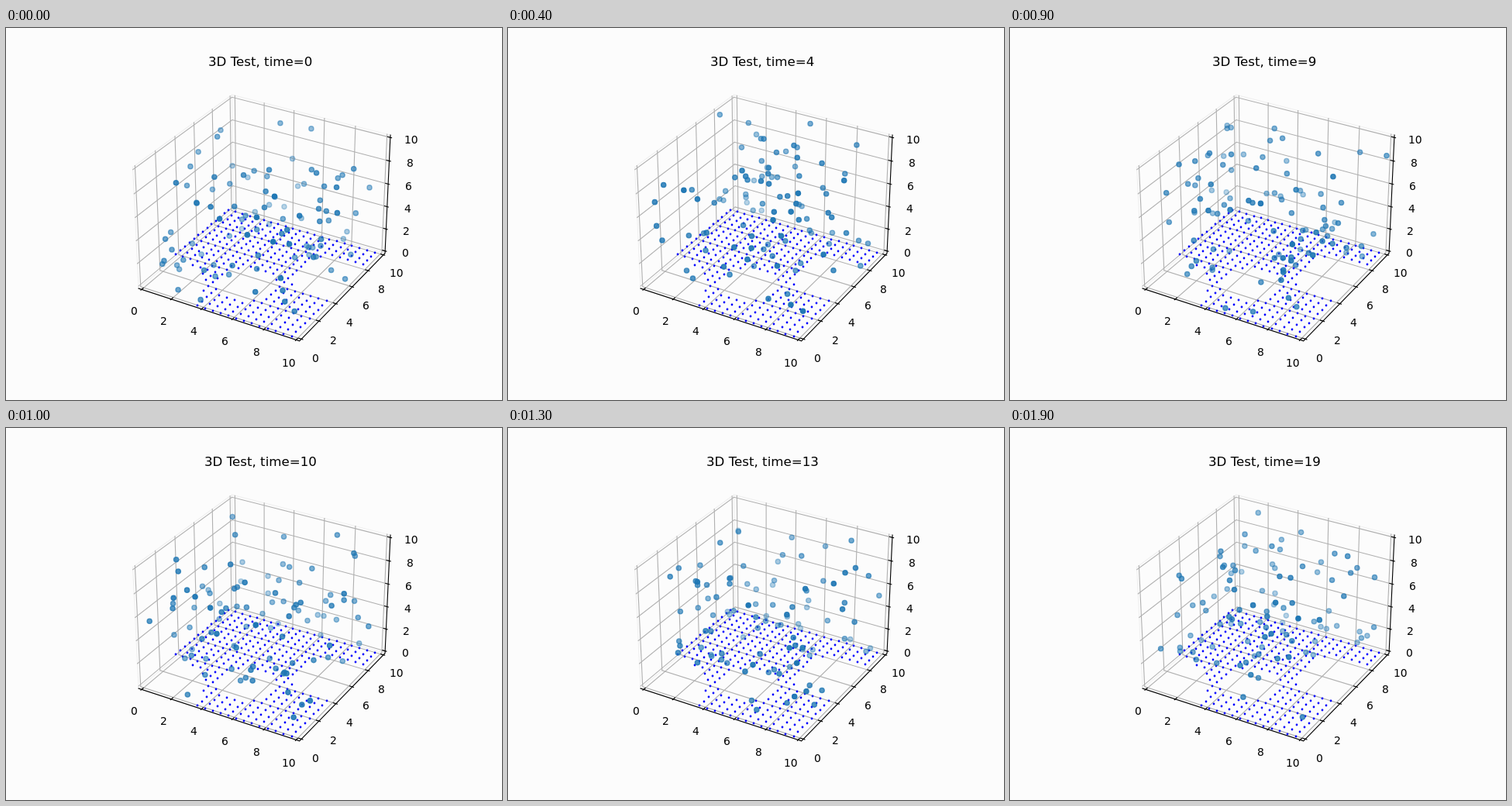
An HTML page with a canvas for the animation above (2000 ms loop, 640 by 480 pixels).

```html
<!DOCTYPE html>
<html lang="en">
<head>
<meta charset="utf-8">
<title>3D Test</title>
<style>
  html, body { margin: 0; width: 100%; height: 100%; overflow: hidden; background: #fcfcfc; }
  canvas { display: block; }
</style>
</head>
<body>
<canvas id="stage" width="640" height="480"></canvas>
<script>
const ctx = document.getElementById('stage').getContext('2d');
const FRAMES = 20, STEP = 100, COUNT = 100;
const LO = -10 / 48, HI = 10 + 10 / 48;   // walls sit slightly outside the data range
const TICKS = [0, 2, 4, 6, 8, 10];
const LABEL_GAP = 0.87;
const LINE = 1.11;
const HOLES = [[0, 0, 3.4], [5, 3, 1.75], [9, 6, 2.25]];

// Perspective view: azimuth -60°, elevation 30°, camera 10 units away.
function project([x, y, z]) {
  const a = (x - 5) * 0.8 / 7, b = (y - 5) * 0.8 / 7, c = (z - 5) * 0.6 / 7;
  const depth = 10 - 0.433 * a + 0.75 * b - 0.5 * c;
  const scale = 1997.84 / depth;
  return {
    x: 333 + scale * (0.866 * a + 0.5 * b),
    y: 237.4 - scale * (-0.25 * a + 0.433 * b + 0.866 * c),
    depth
  };
}

function polyline(color, ...points) {
  ctx.beginPath();
  for (const point of points) {
    const p = project(point);
    ctx.lineTo(p.x, p.y);
  }
  ctx.strokeStyle = color;
  ctx.lineWidth = LINE;
  ctx.lineCap = 'square';
  ctx.stroke();
}

function disc(x, y, r) {
  ctx.beginPath();
  ctx.arc(x, y, r, 0, 2 * Math.PI);
  ctx.fill();
}

// Centred text that starts on a whole pixel.
function text(string, x, y, size) {
  ctx.fillStyle = '#000';
  ctx.font = `${size}px "DejaVu Sans", sans-serif`;
  ctx.fillText(string, Math.ceil(x - ctx.measureText(string).width / 2), y);
}

function drawGrid() {
  const pane = '#f0f0f0', grid = '#b0b0b0';
  polyline(pane, [LO, LO, LO], [LO, LO, HI], [LO, HI, HI], [HI, HI, HI], [HI, HI, LO]);
  polyline(pane, [LO, LO, LO], [LO, HI, LO], [HI, HI, LO]);
  polyline(pane, [LO, HI, LO], [LO, HI, HI]);
  for (const t of TICKS) {
    polyline(grid, [t, LO, LO], [t, HI, LO], [t, HI, HI]);
    polyline(grid, [HI, t, LO], [LO, t, LO], [LO, t, HI]);
    polyline(grid, [LO, LO, t], [LO, HI, t], [HI, HI, t]);
  }
}

function drawAxes() {
  const near = LO - LABEL_GAP, far = HI + LABEL_GAP;
  const inner = 0.167, outer = 0.083;
  polyline('#000', [LO, LO, LO], [HI, LO, LO], [HI, HI, LO], [HI, HI, HI]);
  for (const t of TICKS) {
    polyline('#000', [t, LO - outer, LO], [t, LO + inner, LO]);
    polyline('#000', [HI + outer, t, LO], [HI - inner, t, LO]);
    polyline('#000', [HI + outer, HI, t], [HI - inner, HI, t]);
    for (const spot of [[t, near, near], [far, t, near], [far, far, t]]) {
      const p = project(spot);
      text(t, p.x, Math.round(p.y + 11), 13.89);
    }
  }
}

// Half-unit lattice on the floor, with round clearings.
function drawFloor() {
  ctx.fillStyle = '#00f';
  for (let x = -0.25; x < 10; x += 0.5) {
    for (let y = -0.25; y < 10; y += 0.5) {
      if (HOLES.some(([cx, cy, r]) => Math.hypot(x - cx, y - cy) < r)) continue;
      const p = project([x, y, 0]);
      disc(Math.round(p.x), Math.round(p.y), 1.39);
    }
  }
}

function seededRandom(seed) {
  return () => {
    seed = (seed + 0x6D2B79F5) | 0;
    let t = Math.imul(seed ^ (seed >>> 15), 1 | seed);
    t = (t + Math.imul(t ^ (t >>> 7), 61 | t)) ^ t;
    return ((t ^ (t >>> 14)) >>> 0) / 4294967296;
  };
}

// A fresh uniform cloud for each step; farther points are fainter.
function drawCloud(time) {
  const random = seededRandom(1000 + time * 77);
  const points = Array.from({ length: COUNT },
    () => project([random() * 10, random() * 10, random() * 10]));
  points.sort((p, q) => q.depth - p.depth);
  const far = points[0].depth, near = points[COUNT - 1].depth;
  ctx.lineWidth = 1.39;
  for (const p of points) {
    const alpha = 0.3 + 0.7 * (far - p.depth) / (far - near);
    ctx.fillStyle = ctx.strokeStyle = `rgba(31, 119, 180, ${alpha})`;
    disc(p.x, p.y, 3.1);
    ctx.stroke();
  }
}

function draw(time) {
  ctx.fillStyle = '#fcfcfc';
  ctx.fillRect(0, 0, 640, 480);
  drawGrid();
  drawAxes();
  drawFloor();
  drawCloud(time);
  text(`3D Test, time=${time}`, 328, 49, 16.67);
}

const start = performance.now();
let shown = -1;
function tick() {
  const time = Math.floor((performance.now() - start) / STEP) % FRAMES;
  if (time !== shown) draw(shown = time);
  requestAnimationFrame(tick);
}
tick();
</script>
</body>
</html>
```
